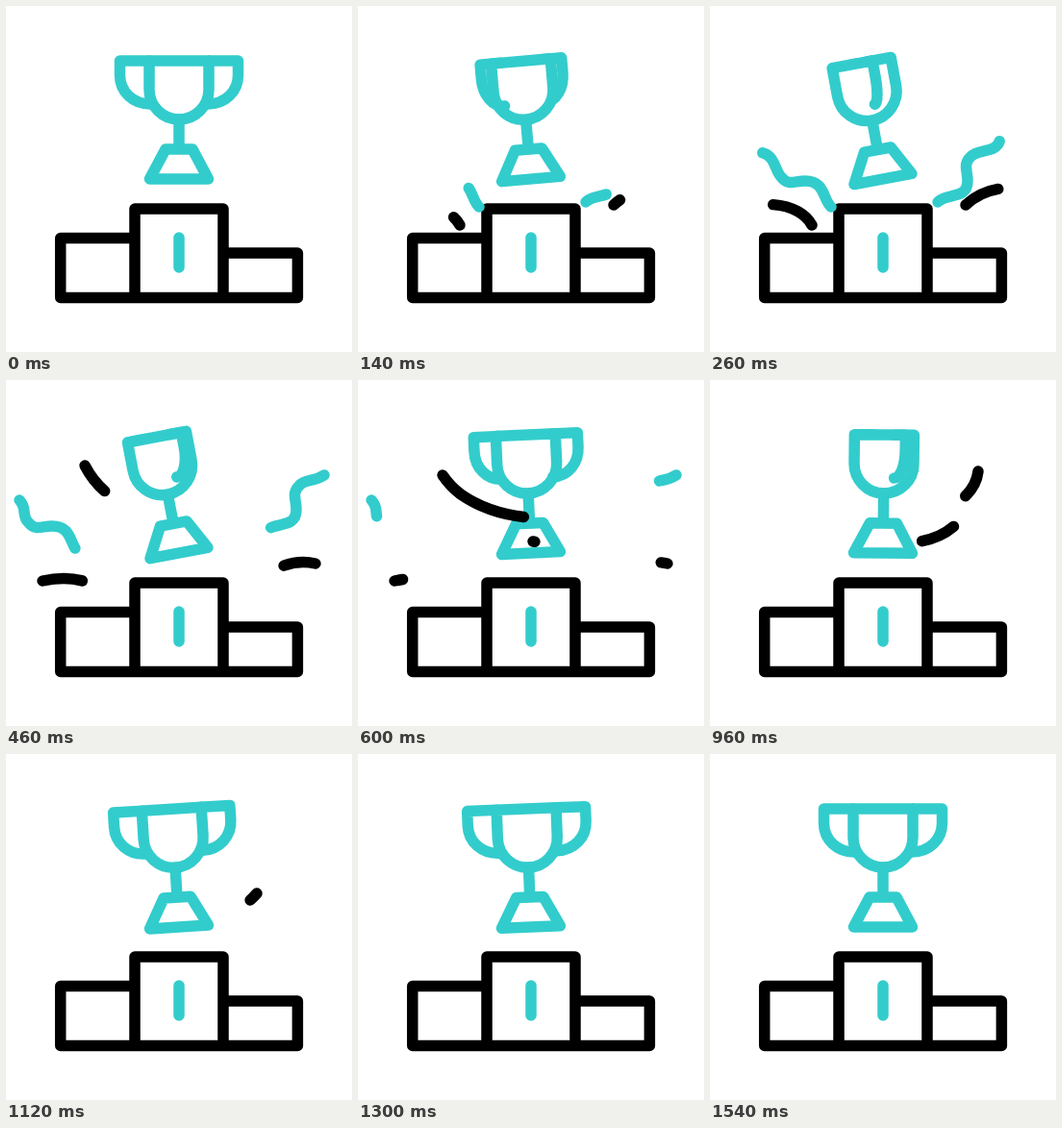
These frames come from a looping animation (360 px wide and 360 px high, 2400 ms). An HTML page:

```html
<!DOCTYPE html>
<html lang="en">
<head>
<meta charset="utf-8">
<title>Trophy on a podium</title>
<style>
  html, body { margin: 0; width: 100%; height: 100%; overflow: hidden; background: #fff; }
  svg { display: block; width: 100%; height: 100%; }
  path { fill: none; stroke: #33cccc; stroke-width: 11.5; stroke-linecap: round; stroke-linejoin: round; }
  .dark { stroke: #000; }
  #cup { fill: #fff; }
</style>
</head>
<body>
<svg viewBox="0 0 360 360">
  <path class="dark" d="M134 303.4V211H226V303.4M134 241.5H56.7V303.4H303.4V257H226"/>
  <path d="M180 241V272"/>
  <g id="trophy">
    <path id="back"/>
    <path id="cup" d="M149 57H211V87A31 31 0 0 1 149 87Z"/>
    <path d="M180 118V149M166 149H194L210.5 180H149.5Z"/>
    <path id="front"/>
  </g>
  <g id="streaks"></g>
</svg>
<script>
const LOOP = 2400;
const $ = id => document.getElementById(id);

// Time keys [ms, value]
const TILT = [[0, 0], [300, -11], [440, -11], [760, 5.7], [1140, -3.7], [1520, 0]];
const SPIN = [[0, 0], [300, 108], [440, 113], [740, 204], [960, 291], [1120, 351], [1240, 360]];

// Streaks: path, head start/end, tail start/end, class
const BURST = [60, 400, 260, 690];
const leftWave = 'c-9-8-6-27-27-27c-11 0-17 5-24-3';
const rightWave = 'c9-10 31-2 31-22c0-11-5-17 3-25';
const streaks = [
  ['M126 209' + leftWave + leftWave + 'c-9-8-1-15-10-24', BURST, ''],
  ['M237 204' + rightWave + rightWave + 'c7-8 14-3 26-11', BURST, ''],
  ['M106 228C98 213 74 201 38 209', BURST, 'dark'],
  ['M266 207C279 195 300 186 322 191', BURST, 'dark'],
  ['M82 89Q92 108 107 119Q140 142 190 144Q235 143 262 124Q277 112 279 95', [320, 910, 526, 1083], 'dark'],
  ['M182 168C215 172 242 167 261 145', [554, 1074, 729, 1224], 'dark']
].map(([d, times, cls]) => {
  const el = document.createElementNS('http://www.w3.org/2000/svg', 'path');
  el.setAttribute('d', d);
  el.setAttribute('class', cls);
  el.setAttribute('pathLength', 1);
  $('streaks').append(el);
  return { el, times };
});

function smooth(a, b, t) {
  const u = Math.min(1, Math.max(0, (t - a) / (b - a)));
  return u * u * (3 - 2 * u);
}

// Monotone cubic interpolation: flat at extremes and at both ends
function curve(keys, t) {
  const n = keys.length - 1;
  if (t >= keys[n][0]) return keys[n][1];
  const i = keys.findIndex((k, j) => t < keys[j + 1][0]);
  const secant = j => (keys[j + 1][1] - keys[j][1]) / (keys[j + 1][0] - keys[j][0]);
  const slope = j => {
    if (j === 0 || j === n) return 0;
    const a = secant(j - 1), b = secant(j);
    return a * b > 0 ? 2 * a * b / (a + b) : 0;
  };
  const [t0, v0] = keys[i], [t1, v1] = keys[i + 1];
  const h = t1 - t0, u = (t - t0) / h, w = 1 - u;
  return v0 * w * w * (1 + 2 * u) + v1 * u * u * (1 + 2 * w)
    + h * u * w * (w * slope(i) - u * slope(i + 1));
}

// One handle seen at horizontal scale k (negative is left)
function handle(k) {
  const x = r => 180 + r * k;
  return `M${x(31)} 57H${x(61.5)}V72C${x(61.5)} 89 ${x(48)} 102 ${x(30)} 102`;
}

function draw(t) {
  $('trophy').setAttribute('transform', `rotate(${curve(TILT, t)} 180 180)`);

  const angle = curve(SPIN, t) * Math.PI / 180;
  const k = Math.cos(angle) * (Math.sin(angle) > 0 ? -1 : 1);
  $('front').setAttribute('d', handle(k));
  $('back').setAttribute('d', handle(-k));

  for (const { el, times: [h0, h1, t0, t1] } of streaks) {
    const head = smooth(h0, h1, t), tail = smooth(t0, t1, t);
    el.style.display = head - tail > 0.002 ? '' : 'none';
    el.style.strokeDasharray = `${head - tail} 2`;
    el.style.strokeDashoffset = -tail;
  }
}

let start;
function tick(now) {
  start ??= now;
  draw((now - start) % LOOP);
  requestAnimationFrame(tick);
}
draw(0);
requestAnimationFrame(tick);
</script>
</body>
</html>
```
